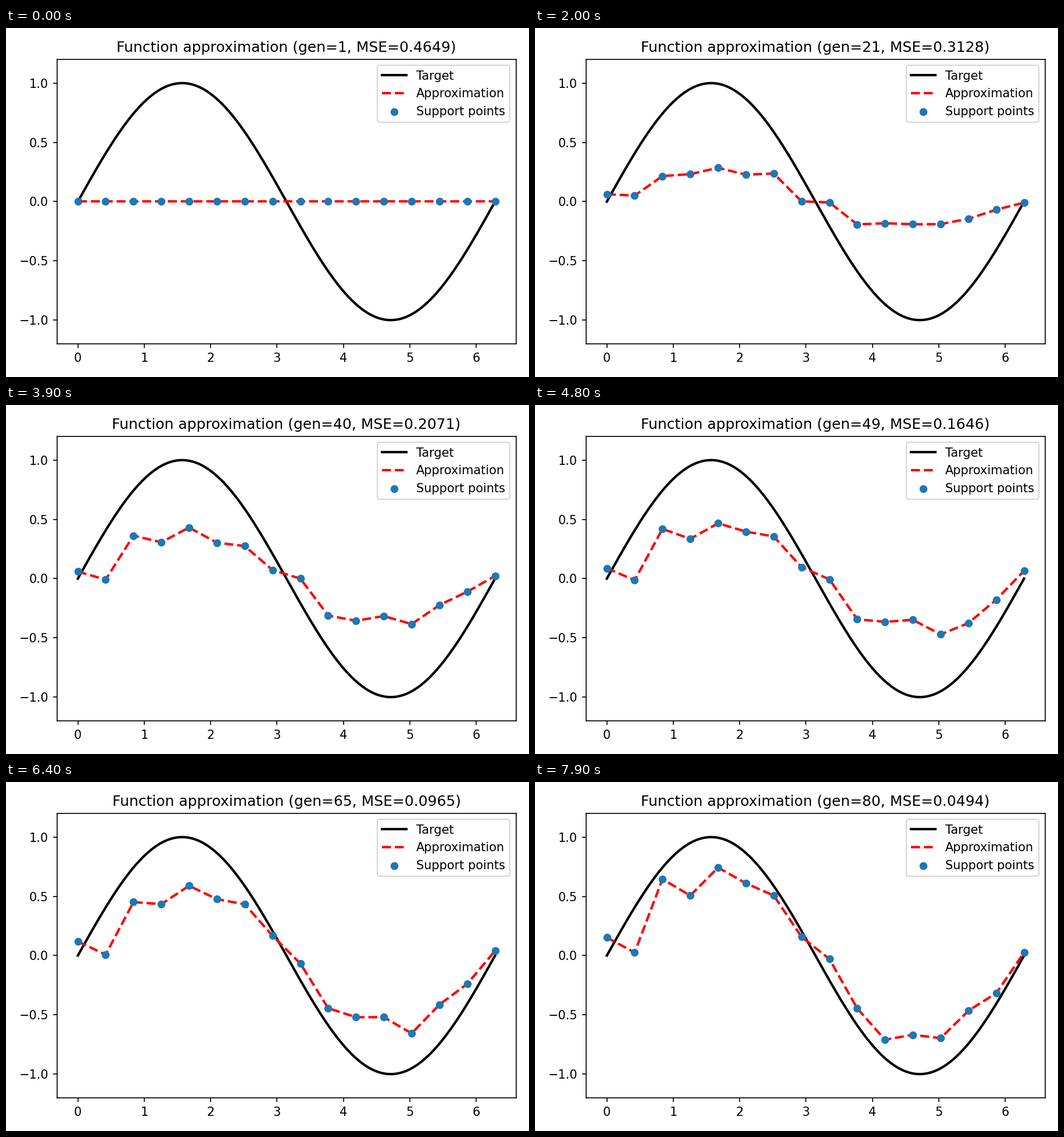
Animation, 900 px wide and 600 px high, one loop 8 s. Source, as a matplotlib script:

```python
import numpy as np
import matplotlib.pyplot as plt
from matplotlib.animation import FuncAnimation

FRAMES = 80
STEP = 0.012  # mutation size per generation

# Error milestones: generation -> MSE
MILESTONES = {1: 0.4649, 13: 0.3691, 29: 0.2566, 40: 0.2071,
              49: 0.1646, 65: 0.0965, 80: 0.0494}
# Heights of the support points in the last generation
FITTED = np.array([.153, .026, .645, .507, .743, .610, .507, .158,
                   -.028, -.445, -.710, -.668, -.697, -.465, -.317, .026])


def evolve(mse, rng):
    """Grow the fit as the error falls, with mutations that cancel out."""
    rms = np.sqrt(mse)
    progress = ((rms[0] - rms) / (rms[0] - rms[-1])) ** 0.85
    walk = np.cumsum(rng.normal(0, STEP, (FRAMES, FITTED.size)), axis=0)
    walk -= walk[0]
    walk -= np.linspace(0, 1, FRAMES)[:, None] * walk[-1]
    return progress[:, None] * FITTED + walk


errors = np.interp(np.arange(1, FRAMES + 1),
                   list(MILESTONES), list(MILESTONES.values()))
history = evolve(errors, np.random.default_rng(4))

x = np.linspace(0, 2 * np.pi, 400)
nodes = np.linspace(0, 2 * np.pi, FITTED.size)

fig, ax = plt.subplots(figsize=(6, 4), dpi=150)
ax.plot(x, np.sin(x), "k-", lw=2, label="Target")
line, = ax.plot(x, np.zeros_like(x), "r--", lw=2, label="Approximation")
dots = ax.scatter(nodes, history[0], s=30, color="C0", zorder=3,
                  label="Support points")
ax.set_xlim(-0.1 * np.pi, 2.1 * np.pi)
ax.set_ylim(-1.2, 1.2)
ax.legend(loc="upper right")


def update(i):
    line.set_ydata(np.interp(x, nodes, history[i]))
    dots.set_offsets(np.column_stack([nodes, history[i]]))
    ax.set_title(f"Function approximation (gen={i + 1}, MSE={errors[i]:.4f})")
    return line, dots


update(0)
fig.tight_layout()
anim = FuncAnimation(fig, update, frames=FRAMES, interval=100,
                     repeat=True, repeat_delay=0, blit=False)
plt.show()
```
